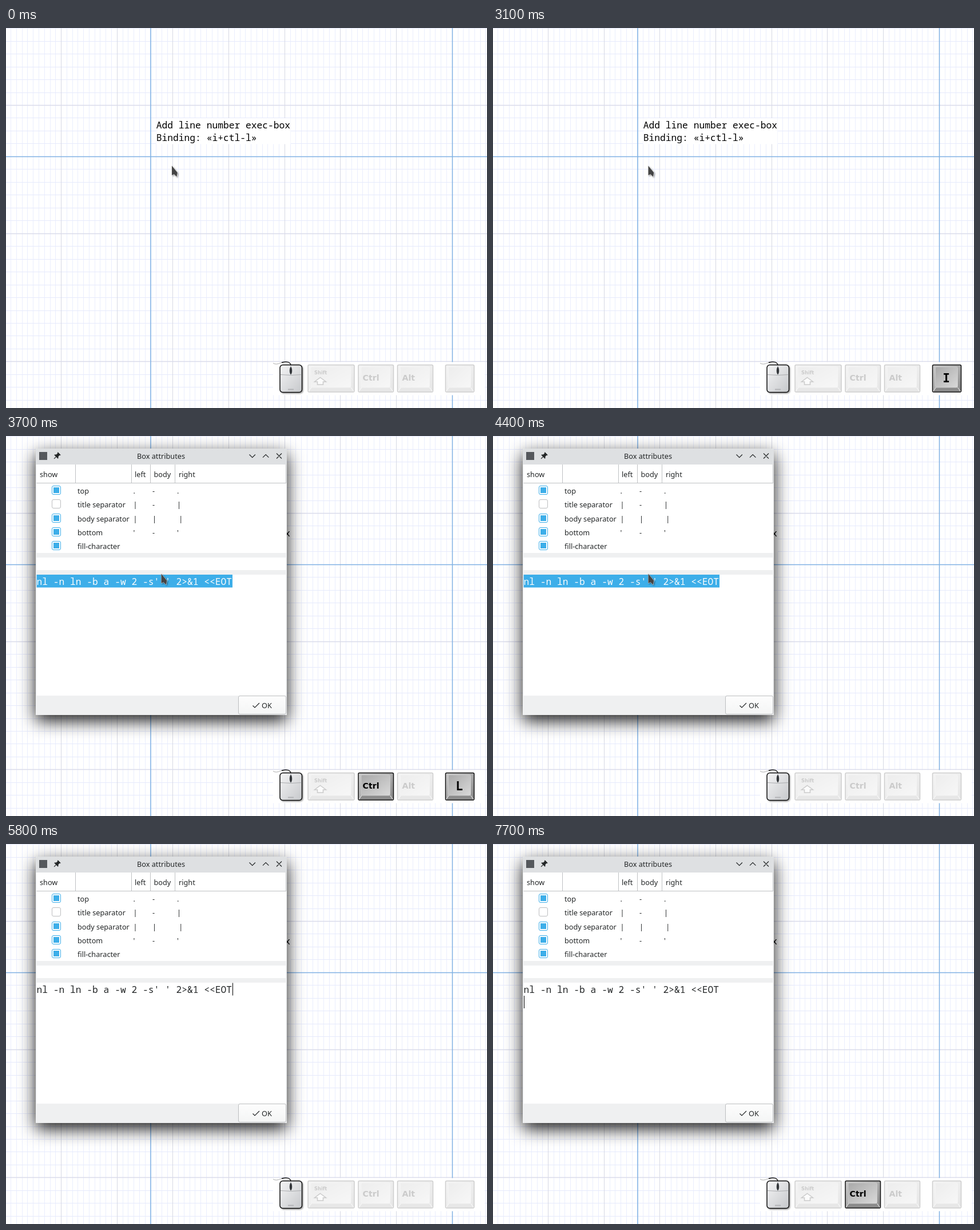
Recreate the animation shown at these times as an HTML page. Size 841 by 666 pixels, loop 8 s.

```html
<!DOCTYPE html>
<html lang="en">
<head>
<meta charset="utf-8">
<title>Line number box</title>
<style>
  html, body { margin: 0; width: 100%; height: 100%; overflow: hidden; background: #fff; }
  svg { display: block; }
  text { white-space: pre; }
  .mono { font: 16.28px "Noto Sans Mono", monospace; }
  .ui { font: 12.7px "Noto Sans", sans-serif; fill: #232627; }
  .key { font-family: "DejaVu Sans", sans-serif; font-weight: 700; fill: #000; }
  .cap { font: 700 21px "DejaVu Sans Mono", monospace; text-anchor: middle; }
  .line { fill: none; stroke: #232627; stroke-width: 1.2; }
</style>
</head>
<body>
<svg id="stage" width="841" height="666" viewBox="0 0 841 666">
  <defs>
    <linearGradient id="rim" x2="1" y2="1">
      <stop offset="0" stop-color="#c9c9c9"/><stop offset=".55" stop-color="#a8a8a8"/><stop offset="1" stop-color="#858585"/>
    </linearGradient>
    <linearGradient id="face" x2="1" y2="1">
      <stop offset="0" stop-color="#a9a9a9"/><stop offset="1" stop-color="#d9d9d9"/>
    </linearGradient>
    <linearGradient id="shell" x2="1" y2="1">
      <stop offset="0" stop-color="#f4f4f5"/><stop offset="1" stop-color="#c6c8cb"/>
    </linearGradient>
    <linearGradient id="button" x2="0" y2="1">
      <stop offset="0" stop-color="#fdfdfd"/><stop offset="1" stop-color="#f4f5f5"/>
    </linearGradient>
    <filter id="shadow" x="-20%" y="-20%" width="140%" height="145%">
      <feDropShadow dx="0" dy="10" stdDeviation="15" flood-color="#000" flood-opacity=".9"/>
    </filter>
    <filter id="soft" x="-20%" y="-20%" width="150%" height="150%">
      <feDropShadow dx="1.5" dy="1.5" stdDeviation="1" flood-color="#000" flood-opacity=".4"/>
    </filter>
  </defs>

  <g id="grid"></g>
  <rect x="262.5" y="158" width="235" height="45.5" fill="#fff"/>
  <text class="mono" x="262.8" y="176">Add line number exec-box</text>
  <text class="mono" x="262.8" y="198">Binding: «i+ctl-l»</text>

  <g id="dialog">
    <path d="M52 489V26q0-4 4-4H487q4 0 4 4V489z" fill="#eff0f1" filter="url(#shadow)"/>
    <path d="M52 50V26q0-4 4-4H487q4 0 4 4V50z" fill="#dee0e2"/>
    <rect x="58" y="28" width="14" height="14" fill="#55585c"/>
    <g transform="translate(89 35) rotate(45)" fill="#232627">
      <path d="M-3.5-6h7v1.5h-1V-1l2 2v1.2h-9V1l2-2v-3.5h-1z"/><path d="M-.6 2h1.2v5h-1.2z"/>
    </g>
    <text class="ui" x="271" y="40" text-anchor="middle">Box attributes</text>
    <path class="line" d="M425.5 32.5l5.2 5.2 5.2-5.2M449 37.7l5.2-5.2 5.2 5.2M473 30.5l9 9m0-9l-9 9"/>
    <path d="M53.500 50H490V205H53.500zM53.500 213H489V235H53.500zM53.500 243H489V455H53.500z" fill="#fff"/>
    <path d="M53.500 82.500H490M121.500 50V82M219.500 50V82M252.500 50V82M295.500 50V82M489.500 50V82" stroke="#bfc1c3"/>
    <g id="rows"></g>
    <rect x="406.500" y="455.500" width="83" height="32" rx="2.500" fill="url(#button)" stroke="#bcbec0"/>
    <path class="line" d="M431.500 472.500l3.500 3.500 8-8"/>
    <text class="ui" x="447" y="476.500">OK</text>
    <rect id="selection" x="53.500" y="243" width="342.500" height="22.500" fill="#3daee9"/>
    <text id="command" class="mono" x="53.500" y="261">nl -n ln -b a -w 2 -s' ' 2&gt;&amp;1 &lt;&lt;EOT</text>
    <rect id="caret" width="1" height="22" fill="#000"/>
  </g>

  <rect x="467" y="585.500" width="370" height="58" fill="#fff"/>
  <path d="M467 587.500C475 592 480 585 488 585.500" fill="none" stroke="#aaa"/>
  <path d="M482 586.500C490 584 498 585 498 592" fill="none" stroke="#111" stroke-width="1.400"/>
  <rect x="479" y="590.500" width="38.500" height="48" rx="5" fill="url(#shell)" stroke="#111" stroke-width="1.500" filter="url(#soft)"/>
  <path id="press" d="M480 607V595q0-4 4-4h10v16z" fill="#4a4a4a"/>
  <path d="M480 607.500Q498 609.500 517 607.500M498 591V608" fill="none" stroke="#a9abae"/>
  <ellipse cx="498" cy="600.500" rx="2.200" ry="6.500" fill="#33363a"/>
  <rect x="493" y="632.500" width="10" height="2" fill="#b3b4b7"/>
  <g id="keys"></g>

  <path id="arrow" d="M0 0V16.500L4 14.800 8.300 19.300 9.800 12z" fill="#454545" stroke="#eee" stroke-width=".8" paint-order="stroke" filter="url(#soft)"/>
  <g id="beam" fill="none">
    <path d="M-3-7.500h6M-3 7.500h6M0-7.500v15" stroke="#fff" stroke-width="3"/>
    <path d="M-3-7.500h6M-3 7.500h6M0-7.500v15" stroke="#333" stroke-width="1.200"/>
  </g>
</svg>
<script>
const $ = id => document.getElementById(id);
const show = (id, on) => $(id).setAttribute('display', on ? 'inline' : 'none');
const place = (id, x, y) => $(id).setAttribute('transform', `translate(${x} ${y})`);

// Graph paper: ten character cells per major square
const CELL_W = 9.767, CELL_H = 22.47;
function ruling(cell, offset, length, vertical, major) {
  let d = '';
  for (let i = 0, p; (p = offset + i * cell) < length; i++) {
    if ((i % 10 === (vertical ? 0 : 6)) !== major) continue;
    const at = Math.floor(p) + .5;
    d += vertical ? `M${at} 0V666` : `M0 ${at}H841`;
  }
  return d;
}
const stroke = (d, color, width = 1) => `<path d="${d}" stroke="${color}" stroke-width="${width}"/>`;
$('grid').innerHTML =
  stroke(ruling(CELL_W, -1.1, 841, true, false), '#eaeefd') +
  stroke(ruling(CELL_H, .7, 666, false, false), '#e6eafc') +
  stroke(ruling(CELL_W, -1.1, 841, true, true), '#d6d8e4') +
  stroke(ruling(CELL_H, .7, 666, false, true), '#d9dbea', 1.3) +
  stroke('M253 0V666M780.5 0V666M0 225.5H841', '#7fb1e3', 1.5);

// Attribute table
const label = (x, y, s) => `<text class="ui" x="${x}" y="${y}">${s}</text>`;
const rows = [
  ['top', '.', '-', '.', true],
  ['title separator', '|', '-', '|', false],
  ['body separator', '|', '|', ' |', true],
  ['bottom', "'", '-', "'", true],
  ['fill-character', '', '', '', true]
];
$('rows').innerHTML =
  label(59, 72, 'show') + label(225, 72, 'left') + label(258.5, 72, 'body') + label(302, 72, 'right') +
  rows.map(([name, left, body, right, on], i) => {
    const y = 95 + Math.round(i * 24.3);
    return `<rect x="80.5" y="${y - 7.5}" width="15" height="15" rx="2.500" fill="#fff" stroke="${on ? '#3daee9' : '#bcbec0'}"/>` +
      (on ? `<rect x="83" y="${y - 5}" width="10" height="10" fill="#3daee9"/>` : '') +
      label(125, y + 6, name) + label(222.5, y + 6, left) + label(256, y + 6, body) + label(299, y + 6, right);
  }).join('');

// Keycaps
function keycap(id, x, w, content) {
  const r = x + w;
  return `<g id="${id}"><rect x="${x}" y="590.5" width="${w}" height="47.500" rx="2" fill="url(#rim)" stroke="#111" stroke-width="1.500"/>
    <path d="M${x + 1} 637l5-7H${r - 6}l5 7z" fill="#8b8b8b"/>
    <path d="M${r - 6} 630l5 7M${x + 6} 630l-5 7" stroke="#eee"/>
    <rect x="${x + 5}" y="594" width="${w - 11}" height="36" rx="2" fill="url(#face)" stroke="#cfcfcf" stroke-width=".8"/>${content}</g>`;
}
const legend = (x, y, size, s) => `<text class="key" x="${x}" y="${y}" font-size="${size}">${s}</text>`;
$('keys').innerHTML =
  keycap('shift', 528, 81, legend(539, 607, 8.3, 'Shift') +
    '<path d="M549.5 612.500l10 7.500h-5v5h-10v-5h-5z" fill="#eee" stroke="#000" stroke-width="1.500"/>') +
  keycap('ctrl', 616, 61.5, legend(623.5, 618, 14.2, 'Ctrl')) +
  keycap('alt', 684.5, 62, legend(692.5, 618, 14.2, 'Alt')) +
  keycap('letter', 768.5, 50, '<text id="glyph" class="cap" x="792.5" y="621"></text>') +
  keycap('enter', 752.5, 80.5, legend(762.5, 607.5, 11, 'Enter') +
    '<path d="M784 612.500h-3v5h-11v-3l-7 4.500 7 4.500v-3h14z" fill="#eee" stroke="#000" stroke-width="1.200"/>');
const light = (id, on) => $(id).setAttribute('opacity', on ? 1 : .2);
light('shift', false);
light('alt', false);

const arrowX = [290, 288, 285, 281, 277, 273.5, 271.5];
const between = (t, a, b) => t >= a && t < b;

function draw(t) {
  const tick = Math.floor(t / 100);
  const open = t >= 3700, selected = t < 5600;

  show('dialog', open);
  show('selection', selected);
  $('command').setAttribute('fill', selected ? '#fcfcfc' : '#232627');
  show('caret', t >= 5700);
  if (t >= 6500) place('caret', 54, 266);
  else place('caret', 396, 243.5);

  show('press', between(t, 900, 1200) || between(t, 5600, 5700));
  light('ctrl', between(t, 3400, 4300) || t >= 7700);
  const entering = between(t, 6500, 7200);
  show('enter', entering);
  show('letter', !entering);
  const glyph = between(t, 3100, 3700) ? 'I' : between(t, 3700, 4400) ? 'L' : '';
  $('glyph').textContent = glyph;
  light('letter', glyph);

  show('arrow', t < 4800);
  place('arrow', arrowX[Math.min(tick, 6)], 241.5);
  show('beam', between(t, 4800, 5800));
  const p = Math.min(1, Math.max(0, (tick - 48) / 7));
  const ease = p * p * (3 - 2 * p);
  place('beam', 271.5 - 6 * ease, 245 + 59 * ease);
}

const start = performance.now();
function loop() {
  draw((performance.now() - start) % 8000);
  requestAnimationFrame(loop);
}
loop();
</script>
</body>
</html>
```
